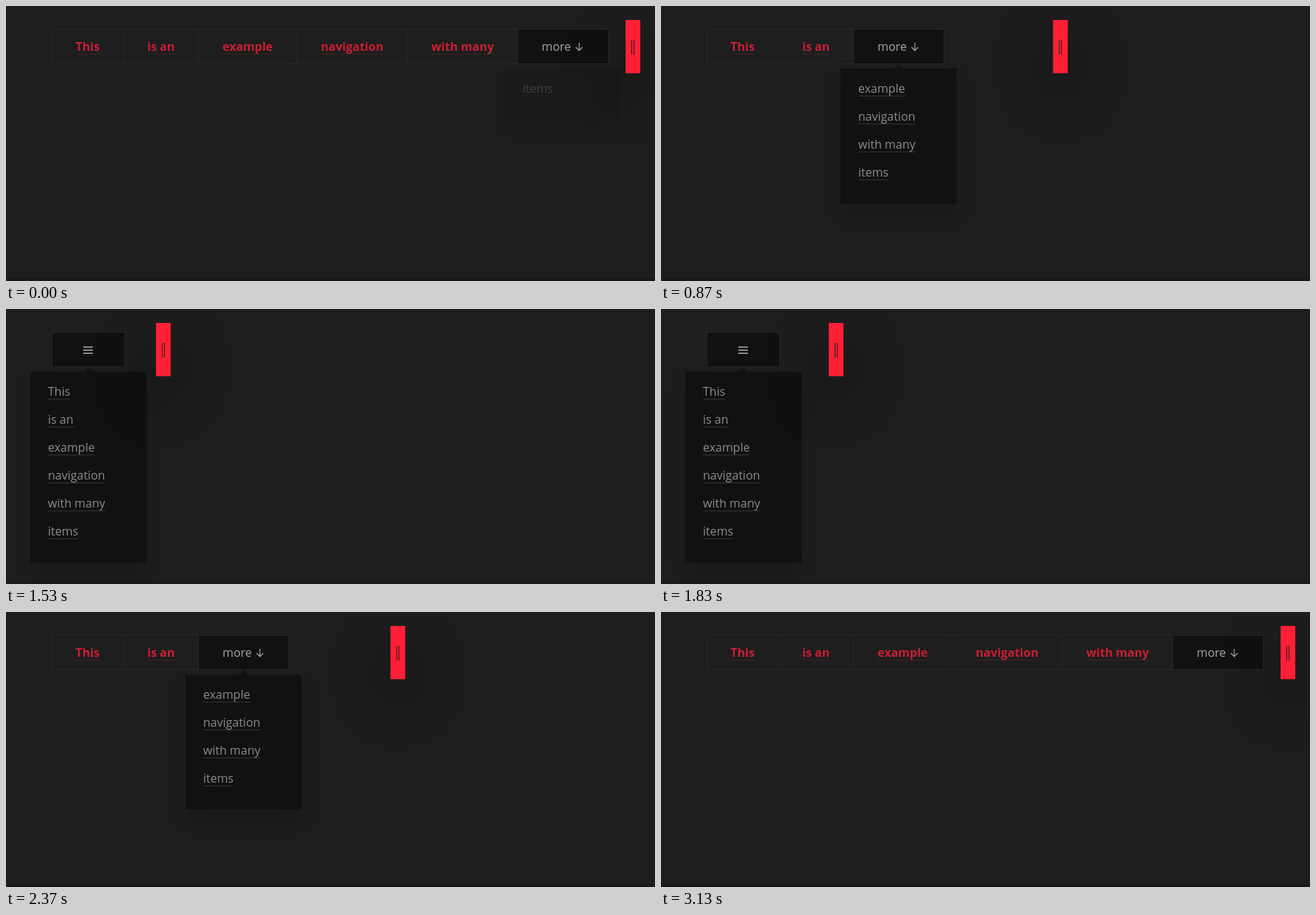
These frames come from a looping animation (882 by 374 pixels, 3.56 s). An HTML page:

```html
<!DOCTYPE html>
<html lang="en">
<head>
<meta charset="utf-8">
<title>Priority navigation</title>
<style>
  html, body { margin: 0; width: 100%; height: 100%; overflow: hidden; background: #1e1e1e; }
  svg { display: block; width: 882px; height: 374px; }
  text { font: 400 16px "Open Sans", sans-serif; }
  .link text { font-weight: 700; fill: #c91f33; }
  .link .line { fill: #3b2025; }
  .edge { fill: #272727; }
  .item text { fill: #8c8c8c; }
  .item .line { fill: #343434; }
  .more text { fill: #a6a6a6; }
</style>
</head>
<body>
<svg id="stage" viewBox="0 0 882 374">
  <defs>
    <filter id="soft" filterUnits="userSpaceOnUse" x="-100" y="-100" width="400" height="600">
      <feGaussianBlur stdDeviation="14"/>
    </filter>
    <filter id="wide" filterUnits="userSpaceOnUse" x="-180" y="-180" width="380" height="520">
      <feGaussianBlur stdDeviation="40"/>
    </filter>
  </defs>
  <rect width="882" height="374" fill="#1e1e1e"/>
  <rect y="370" width="882" height="4" fill="#191919"/>
</svg>
<script>
const LOOP = 3560, TICK = 100 / 3;
const NAV_LEFT = 62, MORE_WIDTH = 123, BURGER_WIDTH = 99, GAP = 20;
const MENU_WIDTH = 158, ROW = 38;
const WIDE = 842, NARROW = 202;
const labels = ["This", "is an", "example", "navigation", "with many", "items"];
// Left edges of the cells, the last one being the final place of the "more" button
const edges = [NAV_LEFT, 159, 261, 395, 545, 695];
const textX = [94.5, 192, 294.3, 427.8, 577.9, 728];

const stage = document.getElementById("stage");

function add(parent, tag, attrs = {}, text = "") {
  const node = document.createElementNS("http://www.w3.org/2000/svg", tag);
  for (const key in attrs) node.setAttribute(key, attrs[key]);
  node.textContent = text;
  return parent.appendChild(node);
}
const rect = (parent, x, y, width, height, attrs) =>
  add(parent, "rect", { x, y, width, height, ...attrs });
const move = (node, x, y = 0) => node.setAttribute("transform", `translate(${x} ${y})`);
const show = (node, on) => node.setAttribute("display", on ? "inline" : "none");

function underlined(parent, x, y, label) {
  const text = add(parent, "text", { x, y }, label);
  const left = Math.round(x);
  rect(parent, left, y + 4, Math.round(text.getComputedTextLength()), 1, { class: "line" });
}

// Visible links
const links = labels.slice(0, 5).map((label, i) => {
  const g = add(stage, "g", { class: "link" });
  const left = edges[i], width = edges[i + 1] - left;
  rect(g, left, 31, 1, 48, { class: "edge" });
  rect(g, left, 31, width, 1, { class: "edge" });
  rect(g, left, 78, width, 1, { class: "edge" });
  underlined(g, textX[i], 61, label);
  return g;
});

// Toggle button
const more = add(stage, "g", { class: "more" });
const moreEdge = rect(more, 0, 31, 0, 48, { class: "edge" });
const moreFill = rect(more, 1, 32, 0, 46, { fill: "#111" });
const moreLabel = add(more, "g");
const moreText = add(moreLabel, "text", { y: 61 }, "more");
add(moreLabel, "path", {
  d: "M84 50V60.5M79.5 56L84 60.7L88.5 56", fill: "none", stroke: "#a6a6a6", "stroke-width": 1.2
});
const burger = add(more, "g", { fill: "#b0b0b0" });
for (const y of [51, 55.2, 59.5]) rect(burger, 43, y, 13, 1.5);

// Dropdown
const menu = add(stage, "g");
const menuShadow = rect(menu, 0, 99, MENU_WIDTH, 0, { filter: "url(#soft)", opacity: 0.2 });
add(menu, "path", { d: "M73 85L79 79L85 85Z", fill: "#121212" });
const menuBox = rect(menu, 0, 85, MENU_WIDTH, 0, { fill: "#111" });
const items = labels.map(label => {
  const g = add(menu, "g", { class: "item" });
  underlined(g, 24, 118, label);
  return g;
});

// Drag handle
const handle = add(stage, "g");
rect(handle, 0, 47, 20, 72, { filter: "url(#wide)", opacity: 0.9 });
rect(handle, 0, 19, 20, 72.4, { fill: "#ff2035" });
rect(handle, 8, 46, 1, 20, { fill: "#26191b" });
rect(handle, 11, 46, 1, 20, { fill: "#26191b" });

function bezier(x1, y1, x2, y2) {
  const at = (a, b, s) => 3 * a * s * (1 - s) ** 2 + 3 * b * s * s * (1 - s) + s ** 3;
  return p => {
    if (p <= 0) return 0;
    if (p >= 1) return 1;
    let lo = 0, hi = 1;
    for (let i = 0; i < 24; i++) {
      const mid = (lo + hi) / 2;
      if (at(x1, x2, mid) < p) lo = mid; else hi = mid;
    }
    return at(y1, y2, lo);
  };
}
const easeInOut = bezier(0.42, 0, 0.58, 1);
const ease = bezier(0.25, 0.1, 0.25, 1);

function visibleCount(space) {
  let n = 5;
  while (n > 0 && edges[n] + MORE_WIDTH + GAP > space) n--;
  return n;
}

function render(time) {
  const t = Math.floor((time + 3.4) / TICK) * TICK;
  const closed = easeInOut((t - 173) / 1415) - easeInOut((t - 1621) / 1490);
  const x = WIDE - (WIDE - NARROW) * closed;
  const n = visibleCount(x);
  const left = edges[n];
  const width = n ? MORE_WIDTH : BURGER_WIDTH;

  links.forEach((link, i) => show(link, i < n));
  move(more, left);
  moreEdge.setAttribute("width", width + 1);
  moreFill.setAttribute("width", width - 1);
  moreText.setAttribute("x", textX[n] - left);
  show(moreLabel, n > 0);
  show(burger, n === 0);

  const height = 32 + ROW * (labels.length - n);
  move(menu, Math.round(left + 0.5 + (width - MENU_WIDTH) / 2));
  menuBox.setAttribute("height", height);
  menuShadow.setAttribute("height", height);
  items.forEach((item, i) => {
    show(item, i >= n);
    move(item, 0, (i - n) * ROW);
  });
  menu.setAttribute("opacity", t > 3125 ? 0 : ease((t + 40) / 200) - ease((t - 2930) / 200));

  move(handle, x.toFixed(2));
}

const start = performance.now();
function frame() {
  render((performance.now() - start) % LOOP);
  requestAnimationFrame(frame);
}
frame();
</script>
</body>
</html>
```
